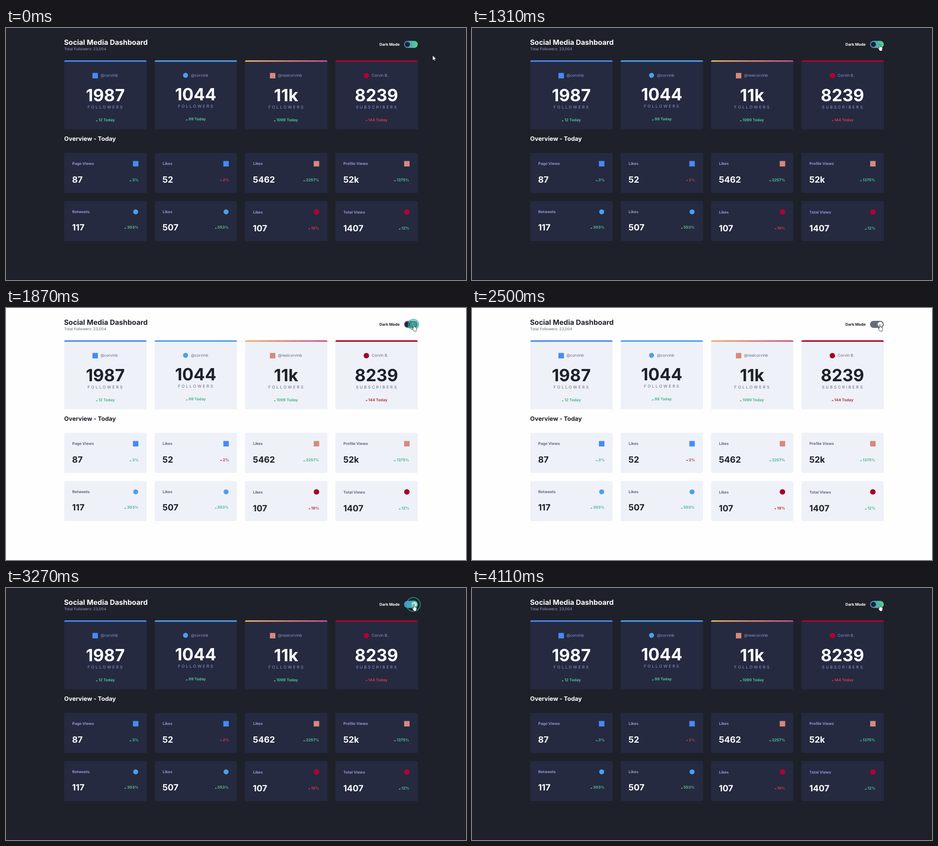
Animation, 1011 px wide and 554 px high, one loop 4180 ms. Source, as an HTML page:

```html
<!DOCTYPE html>
<html lang="en">
<head>
<meta charset="utf-8">
<title>Dashboard theme switch</title>
<style>
  html, body { margin: 0; width: 100%; height: 100%; overflow: hidden; }
  svg {
    --bg: #1e2129; --edge: #181a21; --card: #252a41; --text: #fff; --soft: #8f98d0;
    --up: #4fbf92; --down: #d2374a; --red: #b0032f;
    display: block; width: 100vw; height: 100vh; background: var(--bg);
    font-family: Inter, sans-serif; font-optical-sizing: none; font-size: 8.4px;
    text-rendering: geometricPrecision;
  }
  svg.light {
    --bg: #fefefe; --edge: #fefefe; --card: #eef1f8; --text: #1e202a; --soft: #63687e;
    --up: #50b48c; --down: #b63843; --red: #a50329;
  }
  .bold { font-weight: 700; }
  .text { fill: var(--text); }
  .soft { fill: var(--soft); }
  .up { fill: var(--up); }
  .down { fill: var(--down); }
  .card { fill: var(--card); }
  .title { font-size: 15.6px; }
  .heading { font-size: 13.2px; }
  .big { font-size: 37px; text-anchor: middle; }
  .mid { font-size: 18.9px; }
  .caps { font-size: 8.7px; letter-spacing: 3px; text-anchor: middle; }
  .pointer { fill: #fff; stroke: #111; stroke-width: .8; stroke-linejoin: round; }
</style>
</head>
<body>
<svg id="stage" viewBox="0 0 1011 554" preserveAspectRatio="none">
  <defs>
    <linearGradient id="warm">
      <stop offset="0" stop-color="#e8b368"/>
      <stop offset=".5" stop-color="#dc7f76"/>
      <stop offset="1" stop-color="#c44f88"/>
    </linearGradient>
    <linearGradient id="switch">
      <stop offset="0" stop-color="#4389e0"/>
      <stop offset="1" stop-color="#55d685"/>
    </linearGradient>
  </defs>
  <path d="M0 552.8H1010.2V0" fill="none" stroke="var(--edge)" stroke-width="1.2"/>
  <g id="page"></g>
  <rect id="pill" x="874.8" y="28.2" width="30.2" height="15.6" rx="7.8"/>
  <circle id="knob" cy="36" r="5.6"/>
  <g id="ripple" transform="translate(895.3 36.2)">
    <circle id="disc" fill="#25b8a5"/>
    <circle id="ring" fill="none" stroke="#25b3a6" stroke-width="1.5"/>
    <circle id="dot" r="3.8" fill="#2cb9ae"/>
  </g>
  <path id="arrow" class="pointer" d="M0 0V11.2L2.6 8.9L4.3 12.6L6.1 11.8L4.5 8.2H8Z"/>
  <path id="hand" class="pointer" d="M-1.1 8.6V1.2C-1.1-.4 1.1-.4 1.1 1.2V5.2L4.9 6Q6.5 6.4 6.3 8.2L5.7 11.3L4.9 14.6H.3L-3.3 9.2C-4 8-2.7 7.2-1.9 8Z"/>
</svg>
<script>
const LOOP = 4180, PITCH = 198.67, LEFT = 128, WIDTH = 181;
const FLIPS = [1862, 3262];      // theme turns light, then dark again
const CLICKS = [1800, 3130];
const $ = id => document.getElementById(id);
const stage = $('stage'), page = $('page');

const brands = {
  blue: { color: '#468bf0', bar: '#468bea', round: false },
  sky: { color: '#4b9fee', bar: '#4b9fee', round: true },
  warm: { color: '#d68a7b', bar: 'url(#warm)', round: false },
  red: { color: 'var(--red)', bar: 'var(--red)', round: true }
};

function add(tag, attrs, content) {
  const el = document.createElementNS('http://www.w3.org/2000/svg', tag);
  for (const key in attrs) el.setAttribute(key, attrs[key]);
  if (content) el.textContent = content;
  page.appendChild(el);
}

const label = (x, y, cls, content) => add('text', { x, y, class: cls }, content);

function icon(x, y, brand) {
  const { color: fill, round } = brands[brand];
  if (round) add('circle', { cx: x, cy: y, r: brand === 'sky' ? 5.5 : 6, fill });
  else add('rect', { x: x - 6, y: y - 6, width: 12, height: 12, fill });
}

function change(x, y, amount) {
  const down = amount[0] === '-';
  const cls = down ? 'down' : 'up';
  const d = down ? `M${x - 6.6} ${y - 2.7}h4.8l-2.4 2.5z` : `M${x - 6.6} ${y - .1}h4.8l-2.4 -2.5z`;
  add('path', { d, class: cls });
  label(x - .4, y, cls + ' bold', amount.replace('-', ''));
}

function profileCard(i, [brand, iconX, handle, count, unit, changeX, today]) {
  const x = LEFT + i * PITCH, center = x + WIDTH / 2;
  const lift = brand === 'sky' ? 2 : 0;
  add('rect', { x, y: 73, width: WIDTH, height: 149.6, class: 'card' });
  add('path', { d: `M${x} 74.2Q${x} 71 ${x + 3} 71h${WIDTH - 6}q3 0 3 3.2z`, fill: brands[brand].bar });
  icon(iconX, lift ? 104 : 104.8, brand);
  label(iconX + 11.8, 107, 'soft', handle);
  label(center - .3, 160.9 - lift, 'big bold text', count);
  label(center + .7, 177.2 - lift, 'caps soft', unit);
  change(changeX, 205.2 - lift, today + ' Today');
}

function statCard(i, [brand, title, count, changeX, amount]) {
  const row = i >> 2, x = LEFT + i % 4 * PITCH, y = 274.6 + row * 106;
  const shift = row ? (brand === 'sky' ? -1.6 : .5) : 0;
  add('rect', { x, y, width: WIDTH, height: 88, rx: 3, class: 'card' });
  icon(x + 157, y + (row ? 23.6 : 23.8), brand);
  label(x + 17.6, y + 26.5 + Math.max(shift, -.4), 'soft bold', title);
  label(x + 17.2, y + 65.7 + shift, 'mid bold text', count);
  change(changeX, y + 62 + shift, amount);
}

label(127.4, 37, 'title bold text', 'Social Media Dashboard');
label(127.7, 49, 'soft', 'Total Followers: 23,004');
label(820.7, 38.8, 'text bold', 'Dark Mode');
label(127.8, 248.3, 'heading bold text', 'Overview - Today');

[
  ['blue', 196, '@corvinb', '1987', 'FOLLOWERS', 203.6, '12'],
  ['sky', 394.6, '@corvinb', '1044', 'FOLLOWERS', 401.6, '99'],
  ['warm', 586, '@realcorvinb', '11k', 'FOLLOWERS', 595, '1099'],
  ['red', 792, 'Corvin B.', '8239', 'SUBSCRIBERS', 796.6, '-144']
].forEach((card, i) => profileCard(i, card));

[
  ['blue', 'Page Views', '87', 278, '3%'],
  ['blue', 'Likes', '52', 476.9, '-2%'],
  ['warm', 'Likes', '5462', 659.6, '2257%'],
  ['warm', 'Profile Views', '52k', 859, '1375%'],
  ['sky', 'Retweets', '117', 266.5, '303%'],
  ['sky', 'Likes', '507', 465.4, '553%'],
  ['red', 'Likes', '107', 671, '-19%'],
  ['red', 'Total Views', '1407', 869.5, '12%']
].forEach((card, i) => statCard(i, card));

const path = [
  [0, 937.6, 60], [140, 937.6, 60], [380, 928, 54], [610, 912, 45], [680, 907, 42],
  [820, 899.4, 38.4], [960, 891.5, 33.4], [1170, 895.8, 35.6], [1520, 896.4, 36.4], [LOOP, 896.4, 36.4]
];

const clamp = v => Math.min(1, Math.max(0, v));
const ease = v => v * v * (3 - 2 * v);
const mix = (a, b, k) => a + (b - a) * k;

function pointerAt(t) {
  const n = path.findIndex(p => p[0] > t);
  const [t0, x0, y0] = path[n - 1], [t1, x1, y1] = path[n];
  const k = (t - t0) / (t1 - t0);
  return [mix(x0, x1, k), mix(y0, y1, k)];
}

function draw(t) {
  const light = t >= FLIPS[0] && t < FLIPS[1];
  stage.classList.toggle('light', light);

  const slide = ease(clamp((t - FLIPS[0]) / 300)) - ease(clamp((t - FLIPS[1]) / 300));
  const tone = [[30, 254], [32, 254], [42, 254]].map(([a, b]) => Math.round(mix(a, b, slide)));
  $('pill').setAttribute('fill', light ? '#666b7c' : 'url(#switch)');
  $('knob').setAttribute('cx', mix(882.3, 897.2, slide));
  $('knob').setAttribute('fill', `rgb(${tone})`);

  const age = t - CLICKS[t < CLICKS[1] ? 0 : 1];
  const live = age > 0 && age < 420;
  $('ripple').setAttribute('opacity', live ? 1 - clamp((age - 110) / 310) : 0);
  if (live) {
    const r = 17 * (1 - Math.exp(-age / 63));
    const fade = 1 - clamp((age - 70) / 110);
    $('ring').setAttribute('r', r);
    $('disc').setAttribute('r', Math.min(r, 10.5));
    $('disc').setAttribute('fill-opacity', mix(.2, .45, fade));
    $('dot').setAttribute('opacity', fade);
  }

  const [x, y] = pointerAt(t), over = x < 906;
  for (const id of ['arrow', 'hand']) {
    $(id).setAttribute('transform', `translate(${x} ${y})`);
    $(id).setAttribute('visibility', over === (id === 'hand') ? 'visible' : 'hidden');
  }
}

const start = performance.now();
function tick() {
  draw((performance.now() - start) % LOOP);
  requestAnimationFrame(tick);
}
tick();
</script>
</body>
</html>
```
